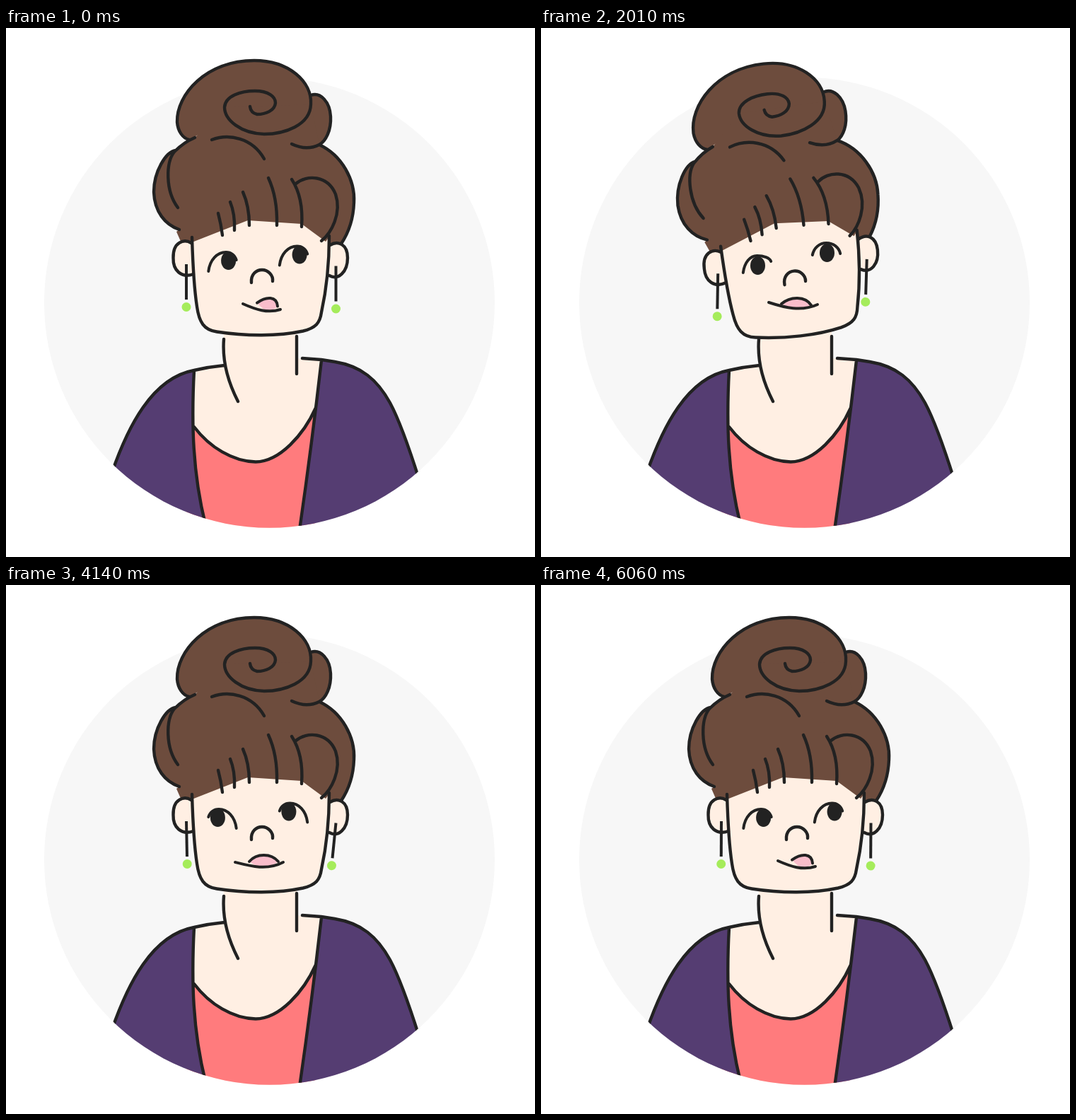
Write an HTML page with a canvas that moves like this. It is 748 px wide and 748 px high and loops after 6540 ms.

```html
<!DOCTYPE html>
<html lang="en">
<head>
<meta charset="utf-8">
<title>Portrait</title>
<style>
html, body { margin: 0; width: 100%; height: 100%; overflow: hidden; background: #fff; }
canvas { display: block; width: 100vw; height: 100vh; }
</style>
</head>
<body>
<canvas id="stage" width="748" height="748"></canvas>
<script>
const ctx = document.getElementById('stage').getContext('2d');
const LOOP = 6540, STEP = 30;
const INK = '#222222', SKIN = '#ffefe3', HAIR = '#6d4c3d', PURPLE = '#553d72',
      CORAL = '#ff7b7d', LIP = '#f9bdcb', GREEN = '#a5ec5b', DISC = '#f7f7f7';
const PIVOT = { x: 375, y: 385 }, TILT = -6.2;

const P = d => new Path2D(d);
const disc = new Path2D();
disc.arc(372.5, 388.3, 318.5, 0, 7);

// Body: fills reuse the drawn lines.
const neckline = 'M266,564 C288,593 321,613 353,613.5 C387,613 421,575 438,537';
const leftCoat = 'M150,628 C172,565 206,495 266,484 C262,560 264,630 282,702';
const rightHem = 'M415,710 C428,620 438,540 446,470';
const rightShoulder = 'L465,472 C502,478 525,497 543,530 C557,556 572,600 584,638';
const chest = 'M307,415 H411 V467 L446,470 V740 H255 V500 L266,484 L309,477 Z';
const bodyLines = P(neckline + leftCoat + rightHem + 'M419,467 L446,469' + rightShoulder +
  'M266,484 Q288,479 309,477 M308,440 C306,465 311,495 328,528 M411,436 V489');

// Head, upright.
const jaw = 'M263,296 C264,330 265,362 270,394 C273,416 280,427 298,429.5 C340,436 385,436 420,428.5 C438,424 444,417 446,402 C452,375 457,340 457,294';
const ears = P('M262,304 C252,298 236,302 236.5,325 C236,343 248,354 265,348 M458,307 C470,300 483,306 483,325 C483,345 470,357 457,350');
const nose = P('M347,360 C346,348 354,342 362,342 C371,342 378,350 377,358');
const bun = `M259,158 C250,156 243,146 242,133 C241,94 283,46 351,46 C400,46 433,76 431,108
  C430,138 393,150 365,150 C332,149 309,130 309,112 C310,96 332,89 352,89
  C371,89 381,97 381,106 C380,117 367,122 355,122 Q346,120 345,111`;
const lobe = 'M431,95 C445,90 458,105 459,125 C460,145 452,160 443,165 Q425,174 404,164';
const leftSide = 'M245,285 C225,278 210,260 209,232 C209,203 226,175 240,173';
const rightSide = 'L443,165 C475,180 494,215 492,247 C491,275 482,293 474,305';
const cap = leftSide + 'L267,155 L309,112 L431,108' + rightSide +
  'H458 V294 L452,302 L418,277 L342,272 L263,303 L248,304 L241,288 Z';
const locks = `M267,155 C255,160 245,168 238,175 C226,190 225,230 243,254
  M291,158 C315,149 348,155 365,185
  M300,262 Q304,277 306,293 M317,246 Q324,263 323,286 M335,232 Q344,252 344,279
  M371,212 Q384,240 383,279 M404,214 Q421,240 418,281
  M410,220 C425,207 455,208 466,235 C475,262 460,290 446,301`;
const hairFills = [bun, lobe, cap].map(P);
const headLines = [ears, nose, P(jaw + bun + lobe + leftSide + 'M443,165' + rightSide + locks)];

// x, y: top of the lid when looking aside; fx, fy, slant: the same when looking ahead.
const EYES = [
  { x: 306, y: 317, fx: 305.5, fy: 322, slant: 8 },
  { x: 406.5, y: 308.5, fx: 403.5, fy: 304, slant: 1 }
];
const MOUTHS = {
  right: { x: 361.5, y: 394, w: 26.5, slant: 4, lipX: 369.5, lipW: 14.5 },
  front: { x: 356.5, y: 389.5, w: 34.5, slant: 1.5, lipX: 361, lipW: 21 },
  left: { x: 358, y: 392, w: 34, slant: 0, lipX: 364.5, lipW: 20.5 }
};
const GAZE = { right: 1, front: 0, left: -1 };

const clamp = x => Math.min(1, Math.max(0, x));
const ease = (t, a, b) => (1 - Math.cos(Math.PI * clamp((t - a) / (b - a)))) / 2;
const mix = (a, b, k) => a + (b - a) * k;

const headAngle = t =>
  -9.5 * ease(t, 970, 1330) + (9.5 + TILT) * ease(t, 1330, 1670) - TILT * ease(t, 3150, 3510) +
  2 * (ease(t, 5130, 5370) - ease(t, 5370, 5730));

function currentLook(t) {
  const [from, to, start] = t < 3000 ? ['right', 'front', 990]
    : t < 5000 ? ['front', 'left', 3170] : ['left', 'right', 5230];
  const k = ease(t, start, start + 300), mouth = {};
  for (const key in MOUTHS[from]) mouth[key] = mix(MOUTHS[from][key], MOUTHS[to][key], k);
  const ahead = name => name === 'front' ? 1 : 0;
  return { mouth, gaze: mix(GAZE[from], GAZE[to], k), front: mix(ahead(from), ahead(to), k) };
}

const blink = t => Math.max(...[75, 2490, 4260].map(start =>
  Math.min(1, 1.2 * Math.sin(Math.PI * clamp((t - start) / 195)))));

// Sideways drift of the earring beads in pixels, a damped wave after each turn of the head.
function swing(t) {
  const wave = (start, period, size, decay) => {
    const u = Math.max(0, t - start);
    return size * clamp(u / 200) * Math.exp(-u / decay) * Math.sin(2 * Math.PI * u / period);
  };
  const [right, ratio] = t < 3090 ? [wave(1270, 800, 8.6, 1000), 0.55]
    : t < 5130 ? [wave(3265, 700, -18, 800), -0.2]
    : [wave(5250, 640, -6, 300), 0.7];
  return [right * ratio, right];
}

function turn(deg) {
  ctx.translate(PIVOT.x, PIVOT.y);
  ctx.rotate(deg * Math.PI / 180);
  ctx.translate(-PIVOT.x, -PIVOT.y);
}

function fill(path, color) {
  ctx.fillStyle = color;
  ctx.fill(path);
}

function drawBody() {
  fill(disc, DISC);
  ctx.save();
  ctx.clip(disc);
  fill(P(chest), SKIN);
  fill(P(neckline + 'V740 H255 V564 Z'), CORAL);
  fill(P(leftCoat + 'V740 H100 Z'), PURPLE);
  fill(P(rightHem + rightShoulder + 'V740 H410 Z'), PURPLE);
  ctx.stroke(bodyLines);
  ctx.restore();
}

function drawHead(angle) {
  ctx.save();
  turn(angle);
  fill(P(jaw + 'V270 H263 Z'), SKIN);
  hairFills.forEach(path => fill(path, HAIR));
  fill(ears, SKIN);
  headLines.forEach(path => ctx.stroke(path));
  ctx.restore();
}

function drawEye(eye, { gaze, front }, shut) {
  const x = mix(eye.x, eye.fx, front), y = mix(eye.y, eye.fy, front);
  const w = 19.7, peak = 5 * gaze, depth = 16 + 3 * Math.abs(gaze), lean = 8 * gaze + eye.slant * front;
  const left = depth + lean, right = depth - lean;
  const fold = v => y + mix(v, 23 + (23 - v) * 0.3, shut);
  ctx.beginPath();
  ctx.ellipse(x + 1 + 7.6 * gaze, y + 12 + 2 * front + 8 * shut, 10.5, 13 * (1 - shut), 0, 0, 7);
  ctx.fillStyle = INK;
  ctx.fill();
  ctx.beginPath();
  ctx.moveTo(x - w, fold(left));
  ctx.bezierCurveTo(x - w + 2, fold(left * 0.4), x + (peak - w) / 2, fold(0), x + peak, fold(0));
  ctx.bezierCurveTo(x + (peak + w) / 2, fold(0), x + w - 2, fold(right * 0.4), x + w, fold(right));
  ctx.stroke();
}

function drawMouth({ x, y, w, slant, lipX, lipW }) {
  const lipY = 391, skew = 1.5 * slant, drop = 0.6 * slant, sag = 0.26 * w;
  const lip = new Path2D(), smile = new Path2D();
  lip.moveTo(lipX - lipW, lipY - drop);
  lip.bezierCurveTo(lipX + skew - lipW / 2, lipY - 12, lipX + skew + lipW / 2, lipY - 12, lipX + lipW, lipY + drop);
  smile.moveTo(x - w, y - slant);
  smile.bezierCurveTo(x - w / 3, y + sag - 3, x + w / 3, y + sag + 3, x + w, y + slant);
  const pink = new Path2D(lip);
  pink.quadraticCurveTo(lipX, 2 * y + 1.5 * sag - lipY, lipX - lipW, lipY - drop);
  fill(pink, LIP);
  ctx.stroke(lip);
  ctx.stroke(smile);
}

function drawEarring(x, y, angle, drift) {
  ctx.save();
  turn(angle);
  ctx.translate(x, y);
  ctx.rotate(-angle * Math.PI / 180 - Math.asin(drift / 60.5));
  ctx.fillStyle = INK;
  ctx.fillRect(-2, 0, 4, 50);
  ctx.beginPath();
  ctx.arc(0, 60.5, 6.5, 0, 7);
  ctx.fillStyle = GREEN;
  ctx.fill();
  ctx.restore();
}

function draw(t) {
  const angle = headAngle(t), look = currentLook(t), [left, right] = swing(t);
  ctx.fillStyle = '#fff';
  ctx.fillRect(0, 0, 748, 748);
  ctx.strokeStyle = INK;
  ctx.lineWidth = 4.4;
  ctx.lineCap = ctx.lineJoin = 'round';
  drawBody();
  drawHead(angle);
  ctx.lineWidth = 4;
  ctx.save();
  turn(angle - TILT * look.front);
  EYES.forEach(eye => drawEye(eye, look, blink(t)));
  ctx.restore();
  drawMouth(look.mouth);
  drawEarring(255, 334, angle, left);
  drawEarring(466.5, 336.5, angle, right);
}

const begin = performance.now();
function tick() {
  const t = (performance.now() - begin) % LOOP;
  draw(Math.floor(t / STEP) * STEP);
  requestAnimationFrame(tick);
}
tick();
</script>
</body>
</html>
```
